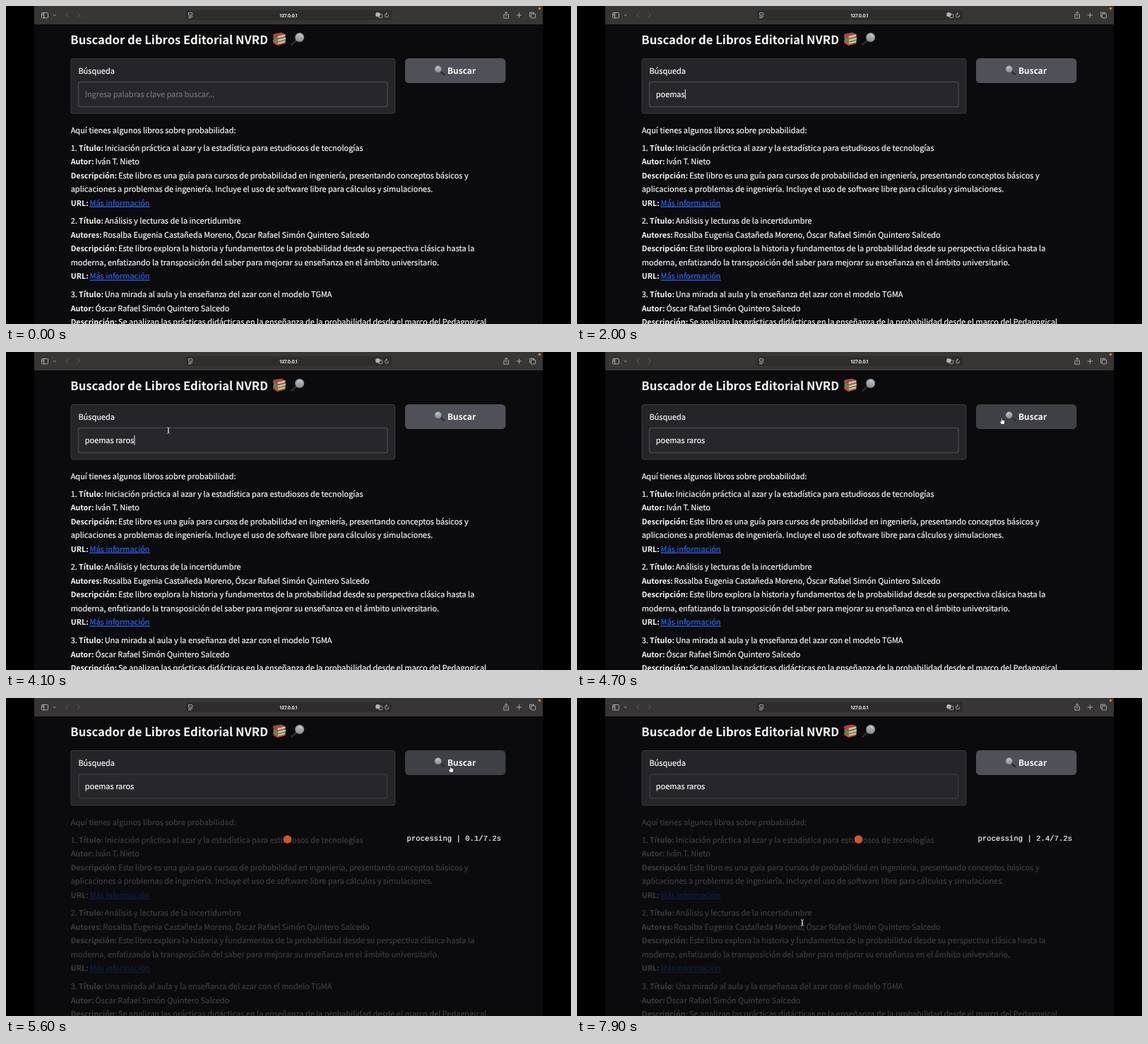
Animation, 800 px wide and 450 px high, one loop 8000 ms. Source, as an HTML page:

```html
<!DOCTYPE html>
<html lang="es">
<head>
<meta charset="utf-8">
<title>Buscador de libros</title>
<style>
  html, body { margin: 0; width: 100%; height: 100%; overflow: hidden; background: #000; }
  svg { display: block; width: 800px; height: 450px; }
  text {
    font: 10.98px "Noto Sans CJK JP", "Noto Sans CJK SC", "Noto Sans CJK", "Noto Sans", sans-serif;
    color: #fafafa; fill: currentColor; stroke: currentColor; stroke-width: .2px;
    text-rendering: geometricPrecision; white-space: pre;
  }
  .label { font-size: 10.7px; font-weight: 600; stroke: none; }
  .link { color: #2866ee; text-decoration: underline; }
  .title { font-size: 16.65px; font-weight: 600; stroke: none; }
  .button { font-size: 12px; font-weight: 600; stroke: none; }
  .hint { color: #71717a; }
  .host { font: 500 6.4px Inter, sans-serif; text-anchor: middle; }
  .timer { font: 10.6px "Liberation Mono", "DejaVu Sans Mono", monospace; }
  .icon { fill: none; stroke: #b5b4b3; stroke-width: .9; stroke-linecap: round; stroke-linejoin: round; }
  .faint { stroke: #5e5d5c; }
</style>
</head>
<body>
<svg viewBox="0 0 800 450">
  <defs>
    <linearGradient id="glass" x1="0" y1="0" x2="0" y2="1">
      <stop offset="0" stop-color="#b9c0c4"/>
      <stop offset="1" stop-color="#8b9397"/>
    </linearGradient>
    <g id="lens">
      <path d="M10 10 12.5 12.3" stroke="#9b9c9f" stroke-width="1.5"/>
      <path d="M12.5 12.3 18.3 17.2" stroke="#2b2b2e" stroke-width="2.8" stroke-linecap="round"/>
      <circle cx="6.8" cy="6.8" r="5.9" fill="url(#glass)" stroke="#8a8c8f" stroke-width="1.2"/>
      <path d="M3.5 6Q4.2 3.5 7 3.2" fill="none" stroke="#dfe4e6" stroke-width=".9"/>
    </g>
    <g id="book">
      <path d="M1 1.8 12 0 18 2.5 7 5.2Z"/>
      <path d="M7 5.2 18 2.5V5.4L7 8.2Z" fill="#cfc5a8"/>
      <path d="M1 1.8 7 5.2V9L1 5.6Q0 3.5 1 1.8Z"/>
      <path d="M7 8.2 18 5.4V7L7 10 1 6.5V5.6Z"/>
    </g>
  </defs>

  <rect x="40" width="720" height="450" fill="#0b0b0d"/>
  <rect x="40" width="720" height="26" fill="#373635"/>
  <rect x="254" y="6" width="292" height="14" rx="3.5" fill="#2e2d2c"/>
  <text class="host" x="400" y="15.5">127.0.0.1</text>
  <g class="icon">
    <rect x="50.5" y="9.5" width="9" height="7.4" rx="1.3"/>
    <path d="M53.7 9.5V17M51.6 11.5H52.6M51.6 13.2H52.6M67.2 12.4 68.7 13.8 70.2 12.4"/>
    <path class="faint" d="M87.7 10 84.7 13 87.7 16M101.3 10 104.3 13 101.3 16"/>
    <rect x="258.5" y="9.7" width="5.4" height="3.3" rx=".6"/>
    <path d="M258.5 15H264M258.5 16.8H262"/>
    <rect x="523.8" y="9.8" width="5.4" height="5" rx="1.2" fill="#b5b4b3"/>
    <rect x="527.6" y="11.6" width="5.2" height="5" rx="1.2"/>
    <path d="M541.7 13.2A2.6 2.6 0 1 1 539.3 10.8M538.5 9.6 539.9 10.8 538.5 12"/>
    <path d="M706.4 12H704.9V17.2H711.5V12H710M708.2 14.5V8.4M706.4 10 708.2 8.3 710 10"/>
    <path d="M723.3 13H729.7M726.5 9.8V16.2"/>
    <path d="M743 14.8H741.6V9.2H747.4V10.7"/>
    <rect x="743.4" y="11" width="6.2" height="6" rx="1"/>
  </g>
  <circle cx="755.5" cy="3.5" r="1.7" fill="#e08a1e"/>

  <text class="title" x="91.3" y="53.6">Buscador de Libros Editorial NVRD</text>
  <use href="#book" x="377.5" y="46" fill="#c4523c"/>
  <use href="#book" x="378" y="41.8" fill="#4a9650"/>
  <use href="#book" x="377.5" y="37.6" fill="#b0483f"/>
  <use href="#lens" transform="translate(422.5 37.5) scale(-1 1)"/>

  <rect x="92" y="74.5" width="459" height="77.5" rx="3" fill="#252529" stroke="#3d3d44" stroke-width=".9"/>
  <text x="102.4" y="95.6">Búsqueda</text>
  <rect id="field" fill="#27272b" stroke="#43434a"/>
  <text id="hint" class="hint" x="111.7" y="128.6">Ingresa palabras clave para buscar...</text>
  <text id="query" x="111.7" y="128.6"></text>
  <rect id="caret" y="118" width="1" height="13.5" fill="#f4f4f5"/>

  <rect id="button" x="565" y="74" width="142.4" height="35" rx="5.5"/>
  <use href="#lens" transform="translate(606.6 84) scale(.76)"/>
  <text class="button" x="624.9" y="96.2">Buscar</text>

  <g id="results"></g>

  <g id="status">
    <circle cx="398.5" cy="200" r="5.8" fill="#d2552b"/>
    <text id="timer" class="timer" x="567.6" y="201.6"></text>
  </g>

  <g id="pointer" stroke-linejoin="round">
    <g id="beam" fill="none">
      <path d="M-2.2-4.3Q0-4.3 0-3V3Q0 4.3-2.2 4.3M2.2-4.3Q0-4.3 0-3V3Q0 4.3 2.2 4.3M-1.2 1H1.2" stroke="#111" stroke-width="2"/>
      <path d="M-2.2-4.3Q0-4.3 0-3V3Q0 4.3-2.2 4.3M2.2-4.3Q0-4.3 0-3V3Q0 4.3 2.2 4.3M-1.2 1H1.2" stroke="#d6d6d8" stroke-width=".9"/>
    </g>
    <path id="arrow" d="M0 0V9L2.1 7.1 3.6 10.4 5.1 9.7 3.7 6.6H6.5Z" fill="#111" stroke="#eee" stroke-width=".8"/>
    <path id="hand" d="M-1.7-3.5Q-.9-4.5-.1-3.5V-.8Q.9-1.4 1.4-.5 2.3-1 2.7-.1 3.8-.4 3.8.8V3L2.9 5.4H-1.3L-3.6 2Q-3.6.8-2.6 1.1L-1.7 1.8Z" fill="#fff" stroke="#151517" stroke-width=".8"/>
  </g>
</svg>

<script>
const LOOP = 8000, STEP = 100;
const QUERY = "poemas raros";
const KEYS = [500, 700, 900, 1100, 1400, 1700, 2200, 2400, 2550, 2700, 2900, 3050];
const CLICK = 5400, SEND = 5500;

// time, x, y of the pointer
const PATH = [
  [3900, 224, 119], [4100, 230, 111], [4300, 330, 103], [4500, 490, 96],
  [4700, 602, 97], [4900, 630, 100], [5800, 630, 100], [6000, 556, 166],
  [6200, 412, 280], [6400, 332, 330], [6700, 332, 330], [7100, 319, 318], [8000, 319, 318]
];

const $ = id => document.getElementById(id);
const show = (id, on) => $(id).setAttribute("visibility", on ? "inherit" : "hidden");
const set = (id, attrs) => {
  for (const name in attrs) $(id).setAttribute(name, attrs[name]);
};

function addText(x, y, text, type = "") {
  const node = document.createElementNS("http://www.w3.org/2000/svg", "text");
  node.setAttribute("x", x);
  node.setAttribute("y", y);
  node.setAttribute("class", type);
  node.textContent = text;
  $("results").append(node);
}

const LABEL_END = { "Autor:": 126.6, "Autores:": 137.3, "Descripción:": 159, "URL:": 118.5 };

function addField(y, label, value, type) {
  addText(91.7, y, label, "label");
  addText(LABEL_END[label], y, value, type);
}

function addBook(y, number, title, label, author, about) {
  const row = 19.5;
  addText(91.7, y, number + ".");
  addText(103.1, y, "Título:", "label");
  addText(139.7, y, title);
  addField(y + row, label, author);
  addField(y + row * 2, "Descripción:", about[0]);
  if (about.length < 2) return;
  addText(91.7, y + row * 3, about[1]);
  addField(y + row * 4, "URL:", "Más información", "link");
}

addText(91.7, 180, "Aquí tienes algunos libros sobre probabilidad:");
addBook(204.7, 1, "Iniciación práctica al azar y la estadística para estudiosos de tecnologías",
  "Autor:", "Iván T. Nieto", [
    "Este libro es una guía para cursos de probabilidad en ingeniería, presentando conceptos básicos y",
    "aplicaciones a problemas de ingeniería. Incluye el uso de software libre para cálculos y simulaciones."
  ]);
addBook(308.4, 2, "Análisis y lecturas de la incertidumbre",
  "Autores:", "Rosalba Eugenia Castañeda Moreno, Óscar Rafael Simón Quintero Salcedo", [
    "Este libro explora la historia y fundamentos de la probabilidad desde su perspectiva clásica hasta la",
    "moderna, enfatizando la transposición del saber para mejorar su enseñanza en el ámbito universitario."
  ]);
addBook(412.2, 3, "Una mirada al aula y la enseñanza del azar con el modelo TGMA",
  "Autor:", "Óscar Rafael Simón Quintero Salcedo", [
    "Se analizan las prácticas didácticas en la enseñanza de la probabilidad desde el marco del Pedagogical"
  ]);

function pointerAt(t) {
  const i = PATH.findIndex(point => point[0] > t);
  if (i < 1) return null;
  const [t0, x0, y0] = PATH[i - 1], [t1, x1, y1] = PATH[i];
  const k = (t - t0) / (t1 - t0);
  return [x0 + (x1 - x0) * k, y0 + (y1 - y0) * k];
}

const inside = (p, x0, y0, x1, y1) => p && p[0] > x0 && p[0] < x1 && p[1] > y0 && p[1] < y1;

function drawField(t) {
  const typed = KEYS.filter(key => key <= t).length;
  const lastKey = typed ? KEYS[typed - 1] : -600;
  const focused = t < CLICK;
  $("query").textContent = QUERY.slice(0, typed);
  show("hint", !typed);
  show("caret", focused && (t - lastKey) % 1000 < 500);
  set("caret", { x: 111.9 + (typed ? $("query").getComputedTextLength() : 0) });
  set("field", focused
    ? { x: 102.5, y: 107.4, width: 437.6, height: 35.2, rx: 2.5, "stroke-width": 1.5 }
    : { x: 103, y: 108, width: 436.6, height: 34, rx: 2, "stroke-width": .9 });
}

function drawPointer(t) {
  const p = pointerAt(t);
  const onButton = inside(p, 565, 74, 707, 109);
  const onText = inside(p, 103, 107, 540, 143) || inside(p, 92, 168, 690, 450);
  show("pointer", p);
  show("hand", p && onButton);
  show("beam", p && onText);
  show("arrow", p && !onButton && !onText);
  if (p) set("pointer", { transform: `translate(${p[0]} ${p[1]})` });
  set("button", { fill: onButton ? "#3f3f46" : "#505058" });
}

function drawStatus(t) {
  const busy = t >= SEND;
  set("results", { opacity: busy ? .2 : 1 });
  show("status", busy);
  $("timer").textContent = `processing | ${(Math.max(0, t - SEND) / 1000).toFixed(1)}/7.2s`;
}

function frame() {
  const t = Math.floor(performance.now() % LOOP / STEP) * STEP;
  drawField(t);
  drawPointer(t);
  drawStatus(t);
  requestAnimationFrame(frame);
}
frame();
</script>
</body>
</html>
```
